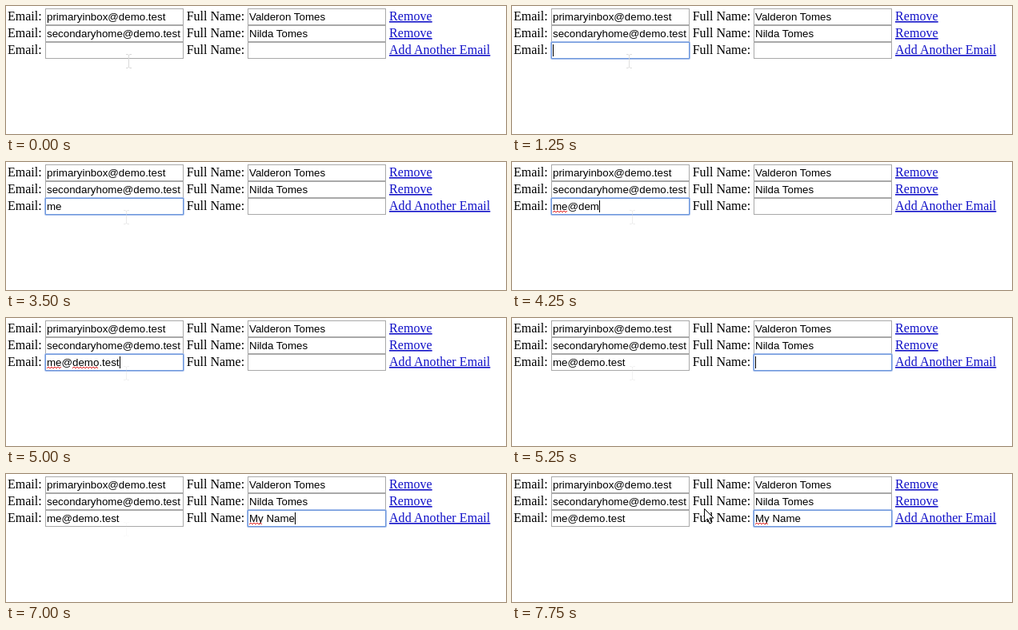
Animation of 625x160 px, one loop 8 s. Source, as an HTML page:

```html
<!DOCTYPE html>
<html lang="en">
<head>
<meta charset="utf-8">
<title>Email list form</title>
<style>
  html, body { margin: 0; width: 100%; height: 100%; overflow: hidden; background: #fff; }
  svg { display: block; }
  text { font: 16px "Liberation Serif", "Times New Roman", serif; }
  .value { font: 13.333px "Liberation Sans", Arial, sans-serif; }
  .link { fill: #1010c8; letter-spacing: .06px; text-decoration: underline 1px; text-underline-offset: 1px; }
  .box { fill: #fff; stroke: #a9a9a9; }
</style>
</head>
<body>
<svg width="625" height="160" viewBox="0 0 625 160">
  <g id="form"></g>
  <g id="focus" fill="none">
    <rect x="-.5" y="-.5" width="174" height="22" rx="1" stroke="#a3bdec"/>
    <rect x=".5" y=".5" width="172" height="20" stroke="#6f98dc"/>
  </g>
  <path id="wave" fill="none" stroke="#e02020"/>
  <rect id="caret" y="48" width="1" height="15"/>
  <path id="beam" fill="none" stroke="#d8d8d8" d="M-3 -8.5H-1L.5 -7.5L2 -8.5H4M.5 -7.5V7.5M-3 8.5H-1L.5 7.5L2 8.5H4"/>
  <path id="arrow" transform="translate(240.5 43.5)" fill="#fff" stroke="#000"
    d="M0 0V16L4 12.5L6.5 18.5L9 17.5L6.5 11.5H11.5Z"/>
</svg>
<script>
const $ = id => document.getElementById(id);
const LOOP = 8000, TICK = 250, ROW = 21;
const rows = [
  ["primaryinbox@demo.test", "Valderon Tomes", "Remove"],
  ["secondaryhome@demo.test", "Nilda Tomes", "Remove"],
  ["", "", "Add Another Email"]
];
// The two fields being filled in; pace > 1 speeds up, pace < 1 slows down
const fields = [
  { x: 49, text: "me@demo.test", focus: 1250, start: 2500, end: 5000, pace: 2 },
  { x: 302, text: "My Name", focus: 5250, start: 5500, end: 7000, pace: .75 }
];

const show = (id, on) => $(id).setAttribute("visibility", on ? "visible" : "hidden");
const move = (id, x, y) => $(id).setAttribute("transform", `translate(${x} ${y})`);
const label = (x, y, s, cls = "") => `<text x="${x}" y="${y}" class="${cls}">${s}</text>`;

$("form").innerHTML = rows.map(([email, name, link], i) => {
  const y = 18 + i * ROW;
  const box = ({ x }, s) =>
    `<rect class="box" x="${x + .5}" y="${y - 14.5}" width="172" height="20"/>` +
    label(x + 2, y, s, "value");
  return label(2, y, "Email:") + box(fields[0], email) + label(225.67, y, "Full Name:") +
    box(fields[1], name) + label(479, y, link, "link");
}).join("");
const inputs = [...document.querySelectorAll(".value")].slice(-2);

const pen = document.createElement("canvas").getContext("2d");
pen.font = '13.333px "Liberation Sans", Arial, sans-serif';
const width = s => pen.measureText(s).width;

function typed({ text, start, end, pace }, t) {
  const u = Math.min(1, Math.max(0, (t - start) / (end - start)));
  return text.slice(0, Math.ceil(text.length * u ** pace));
}

function zigzag(from, to) {
  let d = `M${from} 63`;
  for (let x = from + 2, up = true; x <= to; x += 2, up = !up) d += `L${x} ${up ? 61 : 63}`;
  return d;
}

// Every finished word that is followed by another one is marked
const misspelled = (s, x) => [...s.matchAll(/\w+(?=\W\w)/g)].map(({ 0: word, index }) => {
  const from = x + width(s.slice(0, index));
  return zigzag(from, from + width(word));
}).join("");

function draw() {
  const t = Math.floor(performance.now() % LOOP / TICK) * TICK;
  const active = fields.findLast(f => t >= f.focus);
  fields.forEach((f, i) => inputs[i].textContent = typed(f, t));

  show("focus", active);
  show("wave", active);
  show("caret", false);
  if (active) {
    const text = typed(active, t), x = active.x + 2;
    const typing = text !== typed(active, t - TICK);
    move("focus", active.x, 45);
    $("wave").setAttribute("d", misspelled(text, x));
    $("caret").setAttribute("x", Math.round(x + width(text)));
    show("caret", typing || t % 1000 < 500);
  }

  const pointing = t >= LOOP - TICK;
  move("beam", t < 250 ? 153 : t < 1500 ? 146 : 150, 69);
  $("beam").setAttribute("opacity", 1 - t / LOOP);
  show("beam", !pointing);
  show("arrow", pointing);
  requestAnimationFrame(draw);
}
draw();
</script>
</body>
</html>
```
